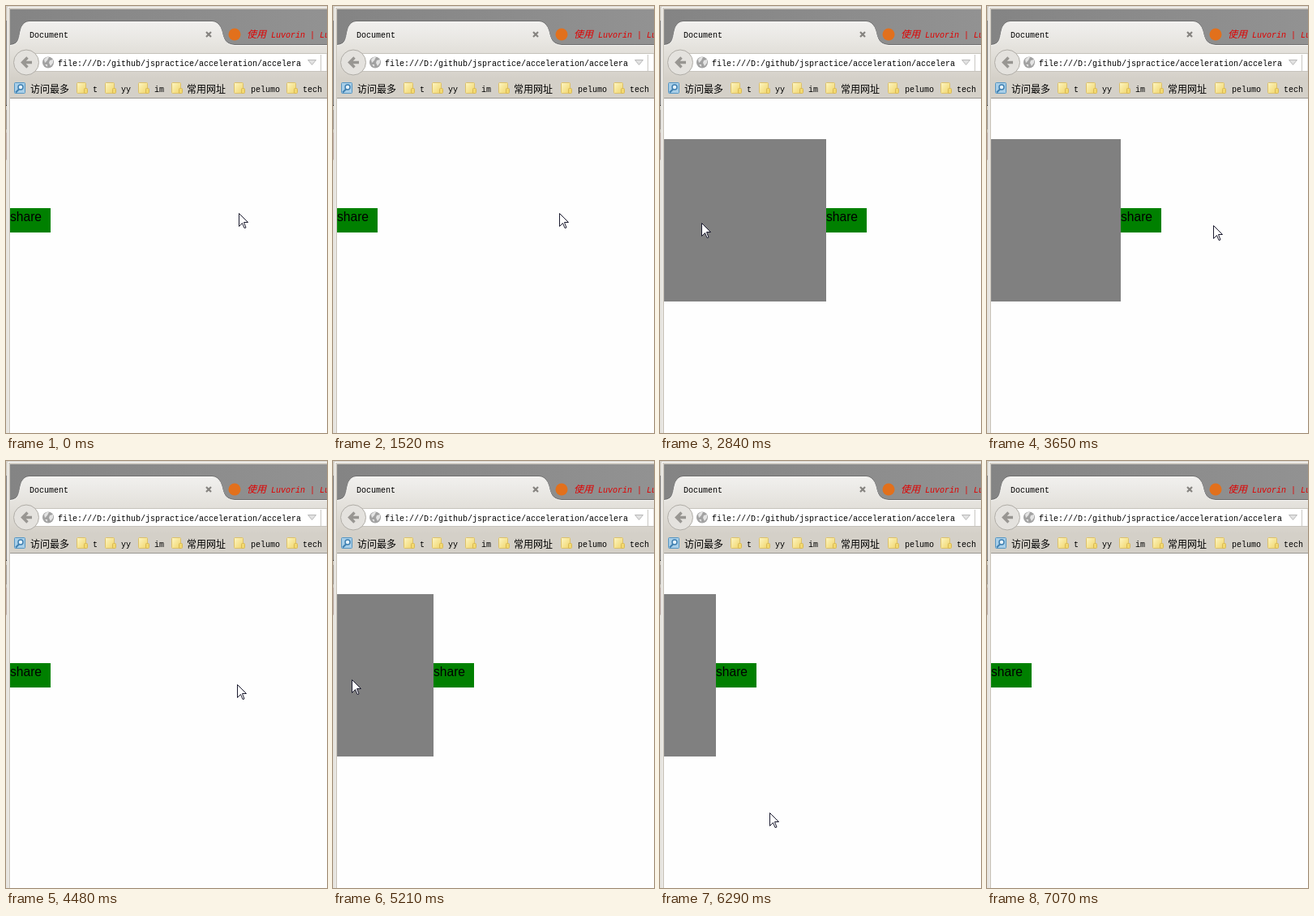
Recreate the animation shown at these times as an HTML page. Size 396x526 px, loop 7.69 s.

```html
<!DOCTYPE html>
<html lang="zh">
<head>
<meta charset="utf-8">
<title>Slide-out share panel</title>
<style>
  html, body { margin: 0; width: 100%; height: 100%; overflow: hidden; background: #fff; }
  svg { display: block; width: 396px; height: 526px; }
  .ui { font-family: "Liberation Mono", "Noto Sans Mono", monospace; font-size: 10px; }
  .cjk { font-family: "Noto Sans CJK SC", "Noto Sans CJK", sans-serif; font-size: 12px; }
  .share { font-family: "Liberation Sans", Arial, sans-serif; font-size: 15.6px; }
</style>
</head>
<body>
<svg viewBox="0 0 396 526">
  <defs>
    <linearGradient id="title"><stop stop-color="#848484"/><stop offset="1" stop-color="#929292"/></linearGradient>
    <linearGradient id="tab" x2="0" y2="1"><stop stop-color="#f1f0ee"/><stop offset="1" stop-color="#e6e4df"/></linearGradient>
    <linearGradient id="bar" x2="0" y2="1"><stop stop-color="#e6e4df"/><stop offset="1" stop-color="#d4d0c8"/></linearGradient>
    <linearGradient id="paper" x2="1" y2="1"><stop stop-color="#fdf6c4"/><stop offset="1" stop-color="#f0d468"/></linearGradient>
    <path id="tabEdge" d="M5 48.500C16 47.500 16 40 18 31Q20 19.500 29 19.500H254Q263 19.500 266 31C268 40 270 47.500 282 48.500H396"/>
    <g id="folder">
      <rect x=".5" y=".5" width="11" height="13" rx="1" fill="url(#paper)" stroke="#dcc06a"/>
      <path d="M9.500 13.500v-5q0-1 1-1h2q1 0 1 1v4q0 1-1 1z" fill="#f2d970" stroke="#d9b854"/>
    </g>
  </defs>

  <!-- Window frame -->
  <path d="M0 0h396v526H0z" fill="#d4d0c8"/>
  <path d="M0 18h1v104H0z" fill="#8c8c8c"/>
  <path d="M0 122h1v1H0z" fill="#333"/>
  <path d="M0 128h1v24H0z" fill="#aaa6a0"/>
  <path d="M0 156h1v33H0z" fill="#c4b4b0"/>
  <path d="M0 190h1v336H0z" fill="#f0eeea"/>
  <path d="M2.500 526V1.500H396" fill="none" stroke="#fff"/>
  <path d="M5 4h391v44H5z" fill="url(#title)"/>
  <path d="M5 113h391v413H5z" fill="#fefefe"/>

  <!-- Toolbars and tab -->
  <path d="M5 48h391v42H5z" fill="url(#bar)"/>
  <path d="M5 113.500h391" stroke="#9a9792"/>
  <use href="#tabEdge" y="-1" fill="none" stroke="#6f6f6f"/>
  <use href="#tabEdge" fill="url(#tab)" stroke="#f6f5f3"/>
  <path d="M247 32l6 6m0-6l-6 6" stroke="#85837f" stroke-width="2.200"/>
  <text class="ui" x="29" y="39">Document</text>
  <circle cx="282" cy="35" r="7.500" fill="#e2701c"/>
  <g fill="#e00000" font-style="italic">
    <text class="cjk" x="297" y="39">使用</text>
    <text class="ui" x="327" y="39">Luvorin | Luvorin</text>
  </g>

  <!-- Address bar -->
  <path d="M30 58.500h366v22H30z" fill="#fff" stroke="#c6c3bc"/>
  <circle cx="25" cy="69.500" r="15.500" fill="#e4e2de" stroke="#b0ada7"/>
  <path d="M32 69.500H21m5.500-6l-6 6 6 6" fill="none" stroke="#989692" stroke-width="3.400"/>
  <circle cx="52" cy="69.500" r="7" fill="#a2a2a2"/>
  <path d="M47 66q3-4 6-3l-2 4-3 3zM54 67l4-1v4l-3 4-2-4zM48 72l3 0 0 3z" fill="#e4e4e4"/>
  <text class="ui" x="64" y="74">file:///D:/github/jspractice/acceleration/accelera</text>
  <path d="M372.500 66.500h10l-5 6z" fill="#e2e2e2" stroke="#b8b8b8"/>
  <path d="M388.500 60v20" stroke="#c9c7c3"/>

  <!-- Bookmarks -->
  <rect x="10.500" y="94.500" width="13" height="13" rx="1" fill="#a9cfe8" stroke="#5595c2"/>
  <circle cx="18" cy="100" r="3" fill="#e6f3fb" stroke="#3f7fb0" stroke-width="1.500"/>
  <path d="M16 102.500l-4 4" stroke="#3f7fb0" stroke-width="2"/>
  <text class="cjk" x="30" y="106.500">访问最多</text>
  <g id="bookmarks"></g>

  <!-- Page -->
  <rect id="panel" x="5" y="164" height="200" fill="#808080"/>
  <g id="share">
    <path d="M5 249h50v30H5z" fill="#008000"/>
    <text class="share" x="5" y="265">share</text>
  </g>
  <path id="cursor" d="M.5.5v16l4-4 2.500 6 2-.5-2.500-6.500h5z" fill="#fff" stroke="#1c1c30"/>
</svg>
<script>
const LOOP = 7690, TICK = 28.5, FULL = 200;
const $ = id => document.getElementById(id);

// Folder x, label x, label
$('bookmarks').innerHTML = [
  [87, 107, 't'], [122, 142, 'yy'], [163, 183, 'im'],
  [204, 223, '常用网址'], [281, 302, 'pelumo'], [346, 366, 'tech']
].map(([x, tx, label]) => {
  const wide = label > '~';
  return `<use href="#folder" x="${x}" y="94"/>
    <text class="${wide ? 'cjk' : 'ui'}" x="${tx}" y="${wide ? 106.5 : 106}">${label}</text>`;
}).join('');

// Pointer moves: start, end, target x, target y
const start = [287, 255];
const moves = [
  [1430, 2240, 51, 267], [3170, 3650, 279, 270], [3650, 3910, 299, 273],
  [4330, 4480, 285, 275], [4630, 5210, 23, 269], [5910, 6290, 135, 433],
  [6660, 7070, 300, 530]
];

// Panel slides: time of the first tick, opening or closing
const slides = [[2240, true], [3640, false], [5110, true], [6165, false]];

function pointerAt(t) {
  let [x, y] = start;
  for (const [from, to, tx, ty] of moves) {
    if (t < from) break;
    const p = Math.min(1, (t - from) / (to - from));
    const s = p * p * (3 - 2 * p);
    x += (tx - x) * s;
    y += (ty - y) * s;
  }
  return [Math.round(x), Math.round(y)];
}

// Each tick covers a fifth of the remaining distance, rounded up
function panelWidth(t) {
  const slide = slides.filter(([from]) => t >= from).pop();
  if (!slide) return 0;
  const [from, opening] = slide;
  let left = FULL;
  for (let n = Math.floor((t - from) / TICK); n >= 0 && left > 0; n--) left -= Math.ceil(left / 5);
  return opening ? FULL - left : left;
}

function draw(now) {
  const t = now % LOOP, width = panelWidth(t);
  $('panel').setAttribute('width', width);
  $('share').setAttribute('transform', `translate(${width})`);
  $('cursor').setAttribute('transform', `translate(${pointerAt(t)})`);
  requestAnimationFrame(draw);
}
draw(performance.now());
</script>
</body>
</html>
```
